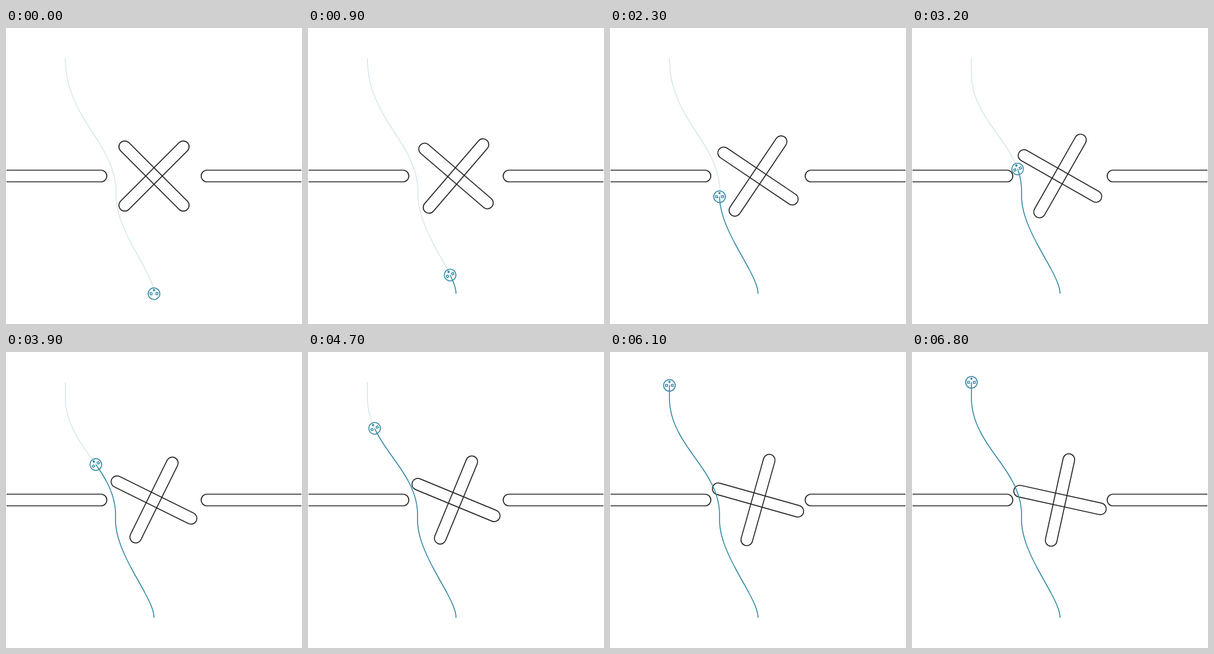
Animation, 508 px wide and 508 px high, one loop 6.9 s. Source, as an HTML page with a canvas:

```html
<!DOCTYPE html>
<html>
<head>
<meta charset="utf-8">
<style>
html, body { margin: 0; width: 100%; height: 100%; overflow: hidden; background: #fff; }
canvas { display: block; width: 508px; height: 508px; }
</style>
</head>
<body>
<canvas id="stage"></canvas>
<script>
const LOOP = 6900, STEP = 100, TOP = 52, BOTTOM = 456;
const INK = '#262626', TEAL = '#2f87a1', PALE = '#d6e8ea';
const canvas = document.getElementById('stage');
const ctx = canvas.getContext('2d');
const ratio = window.devicePixelRatio || 1;
canvas.width = canvas.height = 508 * ratio;

// S-curves with vertical ends: x from, x to, then the four y control values
const lower = [254, 188, 456, 420.5, 350, 288];
const driven = [lower, [188, 102, 280, 200, 161, 78]];
const planned = [[254, 189, 456, 420.5, 350, 288], [189, 102, 285, 195, 158, 52]];

// Height of the robot over time: [ms, y]
const climb = [[0, 456], [500, 446], [900, 424], [1400, 374], [1800, 333], [2300, 289.5],
  [2800, 264], [3200, 242], [3700, 208], [4200, 170], [4700, 131], [5100, 101],
  [5500, 78.5], [5900, 62], [6300, 54.5], [6800, 52]];

const smooth = u => u * u * (3 - 2 * u);
const clamp = u => Math.max(0, Math.min(1, u));

function curveX([x0, x1, a, b, c, d], y) {
  let lo = 0, hi = 1;
  for (let i = 0; i < 22; i++) {
    const u = (lo + hi) / 2, v = 1 - u;
    const h = v * v * v * a + 3 * v * v * u * b + 3 * v * u * u * c + u * u * u * d;
    if (h > y) lo = u; else hi = u;
  }
  return x0 + (x1 - x0) * smooth(lo);
}

const pathX = (path, y) => curveX(y > path[1][2] ? path[0] : path[1], y);

function slope(i) {
  if (i === 0 || i === climb.length - 1) return 0;
  const [t0, y0] = climb[i - 1], [t1, y1] = climb[i + 1];
  return (y1 - y0) / (t1 - t0);
}

function heightAt(t) {
  let i = 0;
  while (i < climb.length - 2 && t > climb[i + 1][0]) i++;
  const [t0, y0] = climb[i], [t1, y1] = climb[i + 1];
  const d = t1 - t0, u = clamp((t - t0) / d), v = 1 - u;
  return y0 + (y1 - y0) * smooth(u) + d * u * v * (v * slope(i) - u * slope(i + 1));
}

function line(from, to, xAt, color) {
  ctx.strokeStyle = color;
  ctx.lineWidth = 1.6;
  ctx.beginPath();
  ctx.moveTo(xAt(from), from);
  for (let y = from - 2; y > to; y -= 2) ctx.lineTo(xAt(y), y);
  ctx.lineTo(xAt(to), to);
  ctx.stroke();
}

function wall(edge, end) {
  ctx.beginPath();
  ctx.moveTo(edge, 244);
  ctx.lineTo(end, 244);
  ctx.arc(end, 254, 10, -Math.PI / 2, Math.PI / 2, edge > end);
  ctx.lineTo(edge, 264);
  ctx.stroke();
}

function arm(angle) {
  ctx.save();
  ctx.translate(254, 254);
  ctx.rotate(angle);
  ctx.beginPath();
  ctx.roundRect(-81, -10, 162, 20, 10);
  ctx.stroke();
  ctx.restore();
}

function robot(x, y, angle) {
  ctx.save();
  ctx.translate(x, y);
  ctx.rotate(angle);
  ctx.strokeStyle = ctx.fillStyle = TEAL;
  ctx.lineWidth = 1.6;
  ctx.beginPath();
  ctx.arc(0, 0, 10, 0, 2 * Math.PI);
  ctx.stroke();
  ctx.lineWidth = 1.4;
  ctx.strokeRect(-6.7, -1.7, 3.4, 3.4);
  ctx.strokeRect(3.3, -1.7, 3.4, 3.4);
  ctx.beginPath();
  ctx.arc(0, -6.2, 1.9, 0, 2 * Math.PI);
  ctx.fill();
  ctx.restore();
}

function draw(t) {
  ctx.setTransform(ratio, 0, 0, ratio, 0, 0);
  ctx.fillStyle = '#fff';
  ctx.fillRect(0, 0, 508, 508);

  const y = heightAt(t);
  const drivenX = h => pathX(driven, h);
  const replan = smooth(clamp((t - 2200) / 1000));
  const planX = h => drivenX(h) * replan + pathX(planned, h) * (1 - replan);
  line(y, TOP, planX, PALE);

  ctx.strokeStyle = INK;
  ctx.lineWidth = 1.7;
  wall(1, 163);
  wall(507, 345);
  const turn = (45 + 4.8 * t / 1000) * Math.PI / 180;
  arm(-turn);
  arm(Math.PI / 2 - turn);

  if (y < BOTTOM) line(BOTTOM, y, drivenX, TEAL);
  const lean = (drivenX(y + 1) - drivenX(y - 1)) / 2;
  robot(drivenX(y), y, -Math.atan(lean));
}

const start = performance.now();
function tick() {
  const t = (performance.now() - start) % LOOP;
  draw(Math.floor(t / STEP) * STEP);
  requestAnimationFrame(tick);
}
tick();
</script>
</body>
</html>
```
